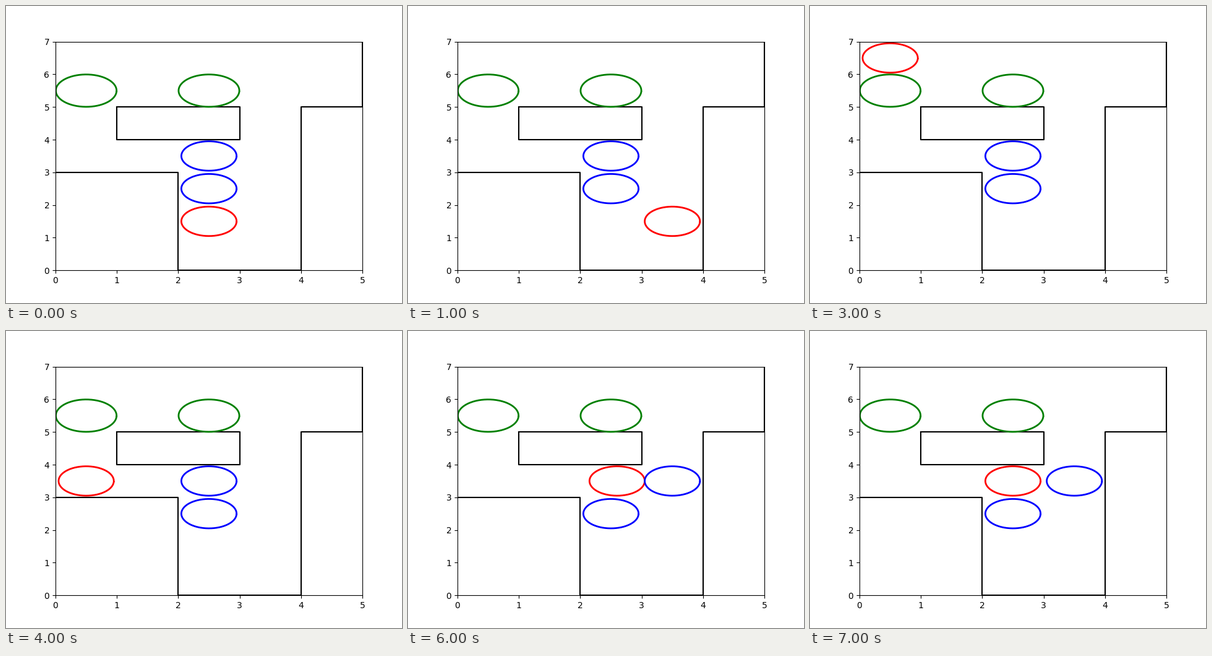
Write a matplotlib script that moves like this. It is 640x480 px and loops after 8000 ms.

```python
import math
import numpy as np
import matplotlib.pyplot as plt
from matplotlib.animation import FuncAnimation

RADIUS = 0.45
ROOM = [(0, 3), (2, 3), (2, 0), (4, 0), (4, 5), (5, 5), (5, 7), (0, 7), (0, 3)]
OBSTACLE = [(1, 5), (1, 4), (3, 4), (3, 5), (1, 5)]
START = (2.5, 1.5)
BLOCK = (2.5, 3.5)
STEPS = 8

angle = np.arange(0, 2 * np.pi, 0.1)


def is_free(x, y):
    in_room = 0 < x < 5 and 0 < y < 7 and (y > 3 or x > 2) and (y > 5 or x < 4)
    in_obstacle = 1 < x < 3 and 4 < y < 5
    return in_room and not in_obstacle


def slide(x, y, dx, dy):
    """Move cell by cell until something is in the way."""
    while is_free(x + dx, y + dy):
        x, y = x + dx, y + dy
    return x, y


def pose(step):
    """Mover and block positions: slide around, touch, push, settle."""
    mover, block = START, BLOCK
    for dx, dy in [(1, 0), (0, 1), (-1, 0), (0, -1)][:step]:
        mover = slide(*mover, dx, dy)
    if step >= 6:
        block = slide(*BLOCK, 1, 0)
    if step >= 5:
        mover = (block[0] - 2 * RADIUS, block[1])
    if step == STEPS - 1:
        mover = (math.floor(mover[0]) + 0.5, mover[1])
    return mover, block


def ring(x, y, r=RADIUS):
    return x + r * np.cos(angle), y + r * np.sin(angle)


fig, ax = plt.subplots(figsize=(6.4, 4.8), dpi=100)
ax.set_xlim(0, 5)
ax.set_ylim(0, 7)

for outline in (ROOM, OBSTACLE):
    ax.plot(*zip(*outline), color="black", lw=1.5)

mover_line, = ax.plot(*ring(*START), color="red", lw=2)
block_line, = ax.plot(*ring(*BLOCK), color="blue", lw=2)
ax.plot(*ring(2.5, 2.5), color="blue", lw=2)
for goal_x in (0.5, 2.5):
    ax.plot(*ring(goal_x, 5.5, 0.495), color="green", lw=2)


def update(step):
    mover, block = pose(step)
    mover_line.set_data(*ring(*mover))
    block_line.set_data(*ring(*block))
    return mover_line, block_line


anim = FuncAnimation(fig, update, frames=STEPS, interval=1000,
                     repeat=True, repeat_delay=0, blit=False)
plt.show()
```
